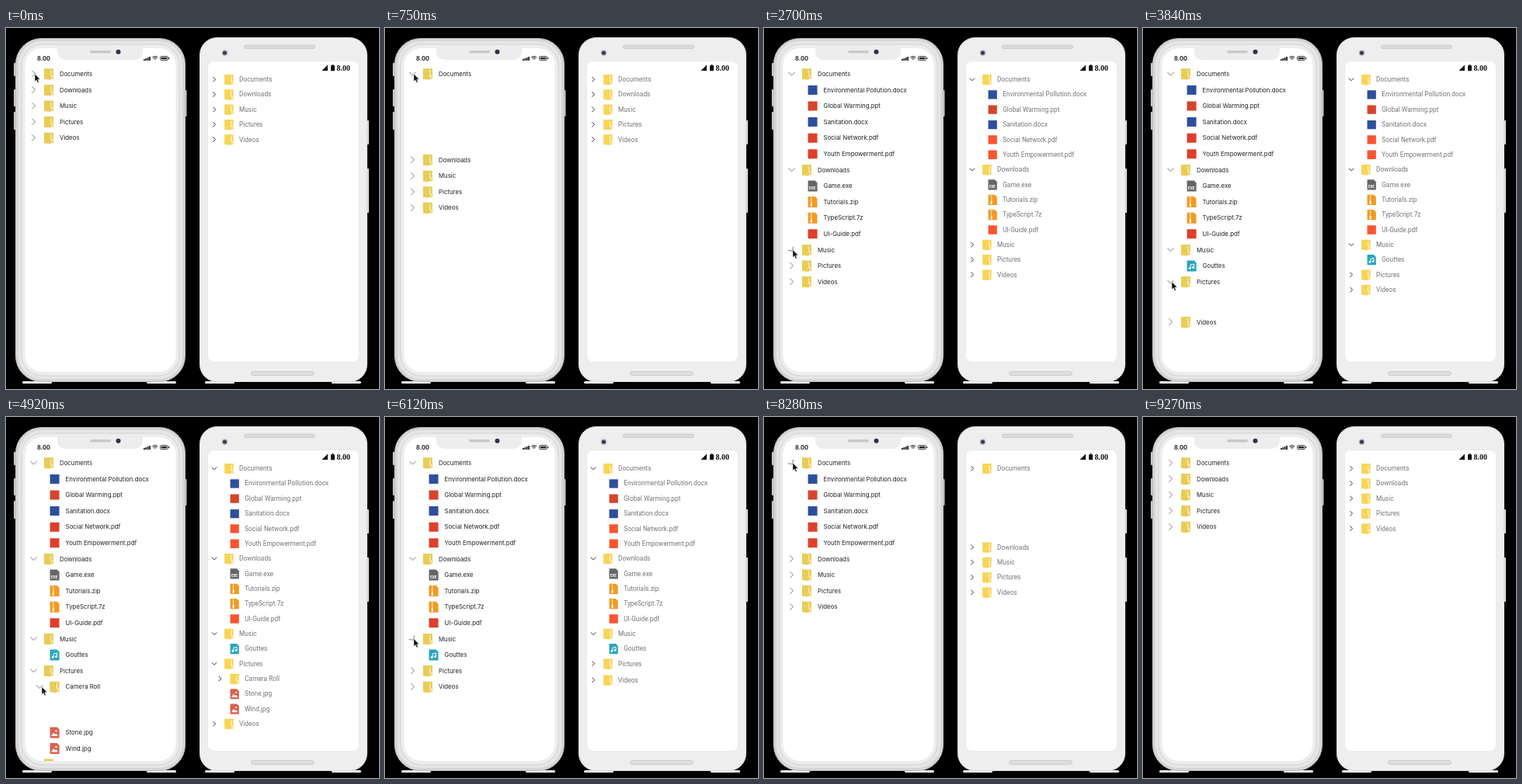
Write an HTML page with a canvas that moves like this. It is 480x465 px and loops after 9.36 s.

```html
<!DOCTYPE html>
<html lang="en">
<head>
<meta charset="utf-8">
<title>Tree view on two phones</title>
<style>
html, body { margin: 0; width: 100%; height: 100%; overflow: hidden; background: #000; }
canvas { display: block; width: 480px; height: 465px; }
</style>
</head>
<body>
<canvas id="stage"></canvas>
<script>
const LOOP = 9360, SLIDE = 300, FADE = 90, CURSOR_END = 8970;
const canvas = document.getElementById('stage');
const ctx = canvas.getContext('2d');
const ratio = window.devicePixelRatio || 1;
canvas.width = 480 * ratio;
canvas.height = 465 * ratio;

const file = (name, icon) => ({ name, icon });
const folder = (name, children = []) => ({ name, icon: 'folder', children });

const tree = [
  folder('Documents', [
    file('Environmental Pollution.docx', 'doc'), file('Global Warming.ppt', 'ppt'),
    file('Sanitation.docx', 'doc'), file('Social Network.pdf', 'pdf'),
    file('Youth Empowerment.pdf', 'pdf')]),
  folder('Downloads', [
    file('Game.exe', 'exe'), file('Tutorials.zip', 'zip'),
    file('TypeScript.7z', 'zip'), file('UI-Guide.pdf', 'pdf')]),
  folder('Music', [file('Gouttes', 'music')]),
  folder('Pictures', [
    folder('Camera Roll', [
      file('WIN_20160726_094117.JPG', 'image'), file('WIN_20160726_094118.JPG', 'image')]),
    file('Stone.jpg', 'image'), file('Wind.jpg', 'image')]),
  folder('Videos')
];

// Folder, its row and the time of the click: the first click opens, the second closes.
const clicks = [
  ['Documents', 0, 430], ['Downloads', 6, 1455], ['Music', 11, 2640],
  ['Pictures', 13, 3600], ['Camera Roll', 14, 4584],
  ['Pictures', 13, 5717], ['Music', 11, 6080], ['Downloads', 6, 7150], ['Documents', 0, 8240]
].map(([name, row, at], i) => ({ name, row, at, lag: i < 5 ? 410 : 130 - 55 * (i - 5) }));

const ios = {
  x: 35.5, y: 59, row: 20.6, indent: 7.6, iconX: 55, textX: 69, scale: 1,
  turn: 100, delay: 90, clickTime: click => click.at,
  font: '7.85px Inter, sans-serif', ink: '#222', arrow: '#808080', arrowSize: 4.2,
  yellow: '#e8cd56', pdf: '#de3f2b', screen: [24.5, 26, 194, 417, 22]
};
const android = {
  x: 268, y: 66.2, row: 19.35, indent: 7.2, iconX: 287, textX: 300, scale: .94,
  turn: 1, delay: 0, clickTime: click => click.at + click.lag,
  font: '8.33px Roboto, sans-serif', ink: '#757575', arrow: '#333', arrowSize: 3.2,
  yellow: '#f7d557', pdf: '#fb5530', screen: [260, 43, 194, 387, 8]
};

const clamp = v => Math.max(0, Math.min(1, v));
const ease = v => (1 - Math.cos(Math.PI * clamp(v))) / 2;

const timesOf = (phone, node) => clicks.filter(c => c.name === node.name).map(phone.clickTime);

function progress([open = Infinity, close = Infinity], t, duration) {
  return t < close ? clamp((t - open) / duration) : 1 - clamp((t - close) / duration);
}

function box(x, y, w, h, r, fill, stroke, width = 1) {
  ctx.beginPath();
  ctx.roundRect(x, y, w, h, r);
  if (fill) { ctx.fillStyle = fill; ctx.fill(); }
  if (stroke) { ctx.strokeStyle = stroke; ctx.lineWidth = width; ctx.stroke(); }
}

function shape(points, fill) {
  ctx.beginPath();
  points.forEach(([x, y]) => ctx.lineTo(x, y));
  ctx.closePath();
  ctx.fillStyle = fill;
  ctx.fill();
}

function line(points, color, width) {
  ctx.beginPath();
  points.forEach(([x, y]) => ctx.lineTo(x, y));
  ctx.strokeStyle = color;
  ctx.lineWidth = width;
  ctx.stroke();
}

function dot(x, y, r, fill) {
  ctx.beginPath();
  ctx.arc(x, y, r, 0, 2 * Math.PI);
  ctx.fillStyle = fill;
  ctx.fill();
}

function label(text, x, y, font, fill) {
  ctx.font = font;
  ctx.fillStyle = fill;
  ctx.fillText(text, x, y);
}

const page = color => shape([[-6, -7], [3, -7], [6, -4], [6, 7], [-6, 7]], color);
const square = color => box(-6, -6, 12, 12, 0, color);

const icons = {
  folder(phone) {
    box(-6, -7, 12, 13.5, .5, phone.yellow);
    line([[2.9, -5], [2.9, 2], [4.3, 2], [4.3, 5.5]], '#fff', 1);
    shape([[-6, -7], [2.2, -5.5], [2.2, 7.5], [-6, 6.5]], phone.yellow);
  },
  doc: () => square('#2d4f9e'),
  ppt: () => square('#d5452c'),
  pdf: phone => square(phone.pdf),
  exe() {
    page('#666');
    label('EXE', -4.6, 4.6, 'bold 4.8px Roboto, sans-serif', '#fff');
  },
  zip() {
    page('#f39a22');
    for (let y = -6; y < 1; y += 2) box(-2.5, y, 1.5, 1.2, 0, '#fff');
    box(-2.8, 1.5, 2.2, 4.5, .4, '#fff');
  },
  music() {
    page('#2ba5bd');
    line([[-1.5, 3], [-1.5, -1.5], [3, -2.5], [3, 2]], '#fff', 1);
    dot(-2.5, 3, 1.5, '#fff');
    dot(2, 2, 1.5, '#fff');
  },
  image() {
    page('#dc604b');
    shape([[-4.5, 4.5], [-1.5, 0], [.5, 2.5], [2, 1], [4.5, 4.5]], '#fff');
    dot(2, -2, 1.2, '#fff');
  }
};

function drawRow(phone, node, depth, y, t) {
  const shift = depth * phone.indent;
  if (node.children) {
    const s = phone.arrowSize;
    ctx.save();
    ctx.translate(phone.x + shift, y);
    ctx.rotate(progress(timesOf(phone, node), t, phone.turn) * Math.PI / 2);
    line([[-s / 2, -s], [s / 2, 0], [-s / 2, s]], phone.arrow, 1);
    ctx.restore();
  }
  ctx.save();
  ctx.translate(phone.iconX + shift, y + .3);
  ctx.scale(phone.scale, phone.scale);
  icons[node.icon](phone);
  ctx.restore();
  label(node.name, phone.textX + shift, y + 2.9, phone.font, phone.ink);
}

// Returns the height taken by the rows; hidden rows are only measured.
function drawTree(phone, nodes, depth, top, t, alpha) {
  let y = top;
  for (const node of nodes) {
    ctx.globalAlpha = alpha;
    if (alpha) drawRow(phone, node, depth, y, t);
    y += phone.row;
    if (!node.children) continue;
    const times = timesOf(phone, node).map(time => time + phone.delay);
    const open = progress(times, t, SLIDE);
    const shown = open === 1 ? clamp((t - times[0] - SLIDE) / FADE) : 0;
    y += ease(open) * drawTree(phone, node.children, depth + 1, y, t, alpha * shown);
  }
  ctx.globalAlpha = 1;
  return y - top;
}

function drawScreen(phone, t) {
  ctx.save();
  box(...phone.screen, '#fff');
  ctx.clip();
  drawTree(phone, tree, 0, phone.y, t, 1);
  ctx.restore();
}

// Bright remains of the shadow below a phone.
function drawShadow(left, right) {
  for (const x of [left, right - 38]) box(x, 455, 38, 3, 1.5, '#f4f4f4');
}

function drawIosBody() {
  drawShadow(21, 219);
  for (const [y, h] of [[45, 17], [79, 22], [108, 23]]) box(10, y, 3, h, 1, '#c8c8c8');
  box(230, 80, 2.5, 34, 1, '#c8c8c8');
  box(12.5, 13.5, 218, 442, 33, '#d6d6d6', '#bdbdbd');
  box(16, 17, 211, 435, 30, '#e6e6e6');
  box(20, 21, 203, 427, 27, '#ededed', '#d2d2d2');
}

function drawIosTop() {
  box(66, 24, 110, 17, [0, 0, 10, 10], '#ededed');
  box(108, 29, 27, 3.5, 1.7, '#c9c9c9');
  dot(144.5, 30.8, 3, '#303050');
  label('8.00', 40, 41.5, 'bold 7.5px Inter, sans-serif', '#222');
  for (let i = 0; i < 4; i++) box(177 + i * 2.4, 40 - i, 1.8, 2 + i, 0, '#222');
  for (const r of [1.5, 3.3, 5]) {
    ctx.beginPath();
    ctx.arc(191.8, 41.5, r, -2.35, -.8);
    ctx.strokeStyle = '#222';
    ctx.lineWidth = 1;
    ctx.stroke();
  }
  box(198.5, 36.5, 10, 5, 1.3, null, '#222', .8);
  box(199.7, 37.7, 7.6, 2.6, .4, '#222');
  box(209.4, 38, 1, 2, 0, '#222');
}

function drawAndroidBody() {
  drawShadow(256, 457);
  for (const [y, h] of [[119, 31], [181, 57]]) box(463, y, 4, h, 1, '#d8d8d8');
  box(249.5, 12.5, 215, 443, 22, '#eee', '#dcdcdc');
  box(306.5, 22, 91, 4.5, 2, '#dadada', '#c8c8c8', .7);
  box(315.5, 442.5, 81, 5, 2.5, '#dedede', '#cdcdcd');
  dot(281.5, 32, 4, '#c4c4c8');
  dot(281.5, 32, 2.6, '#3a3a50');
  box(...android.screen, '#fff', '#e2e2e2', .7);
}

function drawAndroidTop() {
  shape([[406.5, 55], [414, 55], [414, 47.5]], '#111');
  box(418, 48.2, 5, 7, .5, '#111');
  box(419.5, 47.2, 2, 2, 0, '#111');
  label('8.00', 425.5, 55.3, 'bold 10px "Liberation Serif", serif', '#111');
}

// The pointer rests on a clicked arrow, then glides to the next one.
function drawCursor(t) {
  if (t >= CURSOR_END) return;
  const next = clicks.findIndex(click => click.at > t);
  const to = clicks.at(next);
  const from = next > 0 ? clicks[next - 1] : to;
  const k = from === to ? 1 : ease((t - from.at) / (to.at - from.at) * 1.8 - .65);
  const spot = ({ name, row }) => [name === 'Camera Roll' ? 46 : 37, ios.y + ios.row * row];
  const [x0, y0] = spot(from), [x1, y1] = spot(to);
  ctx.save();
  ctx.translate(x0 + (x1 - x0) * k, y0 + (y1 - y0) * k);
  shape([[0, 0], [0, 10], [2.2, 8], [3.7, 11.5], [5.4, 10.8], [4, 7.3], [7, 7.2]], '#151515');
  ctx.strokeStyle = '#fff';
  ctx.lineWidth = .5;
  ctx.stroke();
  ctx.restore();
}

function draw(now) {
  const t = now % LOOP;
  ctx.setTransform(ratio, 0, 0, ratio, 0, 0);
  ctx.fillStyle = '#000';
  ctx.fillRect(0, 0, 480, 465);
  drawIosBody();
  drawAndroidBody();
  drawScreen(ios, t);
  drawScreen(android, t);
  drawIosTop();
  drawAndroidTop();
  drawCursor(t);
  requestAnimationFrame(draw);
}
requestAnimationFrame(draw);
</script>
</body>
</html>
```
